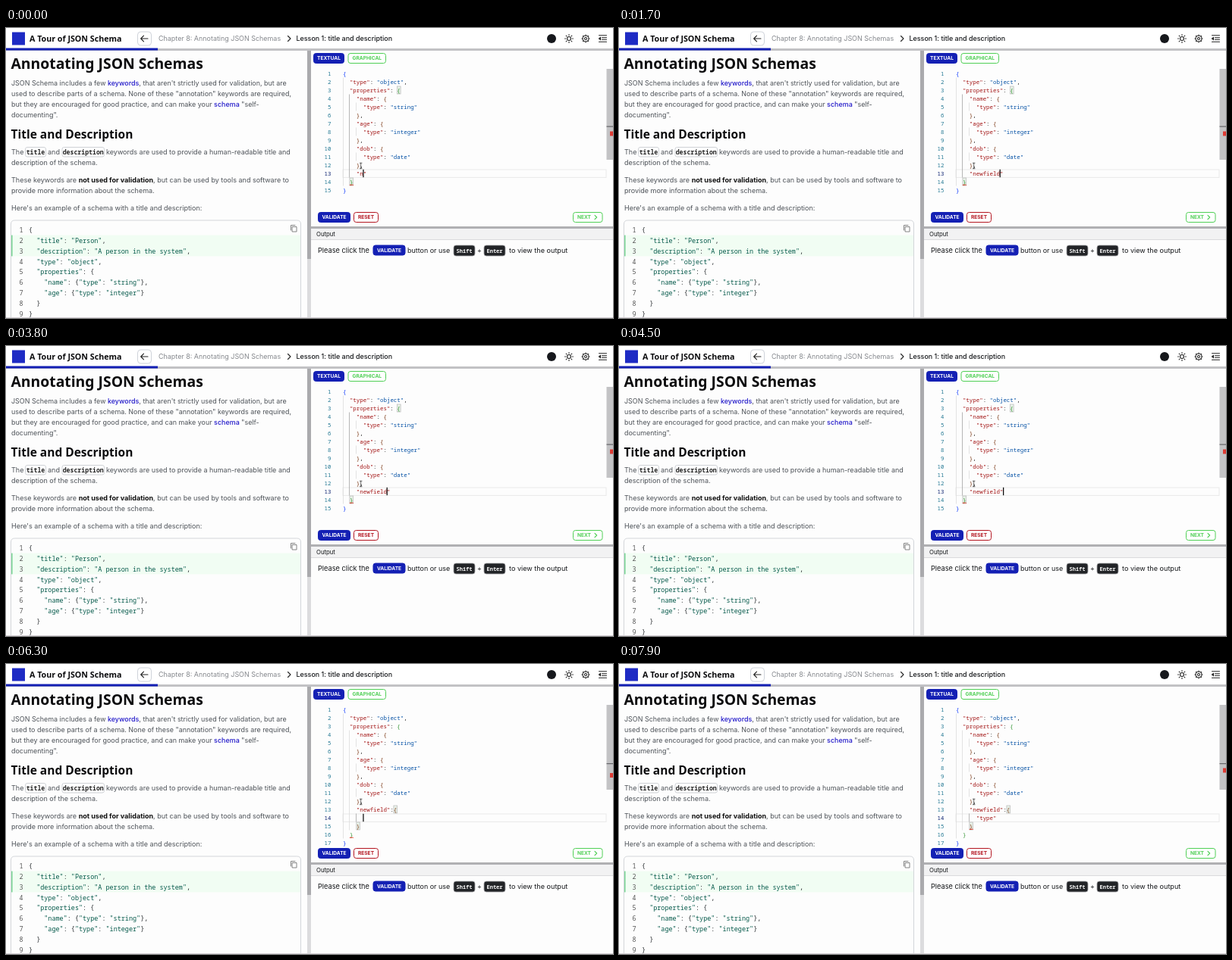
Recreate the animation shown at these times as an HTML page. Size 800 px wide and 383 px high, loop 8 s.

```html
<!DOCTYPE html>
<html lang="en">
<head>
<meta charset="utf-8">
<title>Annotating JSON Schemas</title>
<style>
  html, body { margin: 0; width: 100%; height: 100%; overflow: hidden; background: #fff; }
  svg { display: block; width: 800px; height: 383px; }
  text { white-space: pre; font: 8.95px Inter, sans-serif; fill: #4d5258; }
  .para text { font-size: 9.03px; }
  .head { font-family: "Noto Sans", "Open Sans", sans-serif; font-weight: 700; fill: #0c0c0e; }
  .link { fill: #2118c9; font-weight: 500; }
  .bold { font-weight: 700; fill: #111; }
  .dark { fill: #15171a; }
  .btn { font-size: 6.6px; font-weight: 700; text-anchor: middle; }
  .mono { font-family: "Noto Sans Mono", "DejaVu Sans Mono", monospace; }
  .para .tag { font-size: 8.2px; font-weight: 700; fill: #222; text-anchor: middle; }
  .sample { font-size: 8.46px; fill: #2c3033; }
  .edit { font-size: 7.43px; fill: #222; }
  .line { fill: none; stroke: #222; stroke-width: 1.1; stroke-linecap: round; stroke-linejoin: round; }
</style>
</head>
<body>
<svg viewBox="0 0 800 383">
  <rect y="29" width="800" height="354" fill="#fdfdfd"/>

  <!-- top bar -->
  <rect y="27" width="800" height="3" fill="#c2c2c5"/>
  <rect y="26.5" width="200" height="3" fill="#1420b4"/>
  <rect x="8" y="5.5" width="17" height="17" fill="#1e2bc4"/>
  <text class="head" x="31" y="18" style="font-size:10.7px">A Tour of JSON Schema</text>
  <rect x="173.5" y="5" width="18" height="18" rx="4" fill="#fff" stroke="#cfd3da"/>
  <path class="line" d="M187 14H178M181.5 10.2L177.7 14l3.8 3.8"/>
  <text x="201" y="17.3" style="fill:#85888d">Chapter 8: Annotating JSON Schemas</text>
  <path class="line" d="M371.5 10.5l3.5 3.5-3.5 3.5"/>
  <text class="dark" x="382.5" y="17.3" style="font-weight:500">Lesson 1: title and description</text>
  <circle cx="719" cy="14" r="6" fill="#16181c"/>
  <g id="sun" class="line"><circle cx="742" cy="14" r="2.5"/></g>
  <g id="gear" class="line"><circle cx="764" cy="14" r="4"/><circle cx="764" cy="14" r="1.5"/></g>
  <path class="line" d="M781.5 9.8h10M785.5 12.7h6M785.5 15.3h6M781.5 18.2h10M783.5 12.3L781.5 14l2 1.7z"/>

  <!-- lesson -->
  <text class="head" x="6.5" y="53.7" style="font-size:19.35px">Annotating JSON Schemas</text>
  <text x="7" y="76.3">JSON Schema includes a few <tspan class="link">keywords</tspan>, that aren't strictly used for validation, but are</text>
  <text x="7" y="90.3">used to describe parts of a schema. None of these "annotation" keywords are required,</text>
  <text x="7" y="104.3">but they are encouraged for good practice, and can make your <tspan class="link">schema</tspan> "self-</text>
  <text x="7" y="118.3">documenting".</text>
  <text class="head" x="6.5" y="146.3" style="font-size:15.5px">Title and Description</text>
  <g class="para">
    <text x="7" y="166.5">The</text>
    <rect x="25.5" y="157.5" width="27" height="12.5" rx="2.5" fill="#fff" stroke="#cfd2d6"/>
    <text class="mono tag" x="39" y="166.5">title</text>
    <text x="55" y="166.5">and</text>
    <rect x="74" y="157.5" width="55.5" height="12.5" rx="2.5" fill="#fff" stroke="#cfd2d6"/>
    <text class="mono tag" x="101.7" y="166.5">description</text>
    <text x="132" y="166.5">keywords are used to provide a human-readable title and</text>
    <text x="7" y="180.7">description of the schema.</text>
    <text x="7" y="203.7">These keywords are <tspan class="bold">not used for validation</tspan>, but can be used by tools and software to</text>
    <text x="7" y="217.7">provide more information about the schema.</text>
    <text x="7" y="240.7">Here's an example of a schema with a title and description:</text>
  </g>
  <path d="M6.5 383V259q0-5 5-5H383.5q5 0 5 5V383" fill="#fdfdfd" stroke="#d3d6da"/>
  <rect x="7" y="273.6" width="381" height="27.8" fill="#f1fdf3"/>
  <rect x="7" y="273.6" width="1.6" height="27.8" fill="#7fd69a"/>
  <g id="sample"></g>
  <path class="line" style="stroke:#777;stroke-width:.9" d="M377.5 262.5h5.5v6.5h-5.5zM375.5 267v-6.5h5.5"/>

  <!-- splitters -->
  <rect x="397" y="30" width="5" height="353" fill="#dcdcde"/>
  <rect x="397" y="30" width="5" height="275" fill="#aaaaad"/>

  <!-- editor -->
  <g id="editor"></g>
  <g id="buttons"></g>
  <path class="line" style="stroke:#4fcf55;stroke-width:1.2" d="M776 247.4l2.6 2.6-2.6 2.6"/>

  <!-- output -->
  <rect x="402" y="262" width="398" height="3" fill="#b0b0b3"/>
  <rect x="402" y="265" width="398" height="14" fill="#f2f2f3"/>
  <path d="M402 279.5H800" stroke="#dadadd"/>
  <text class="dark" x="409" y="275" style="font-size:7.75px">Output</text>
  <text class="dark" x="411" y="297.2" style="font-size:9.2px">Please click the</text>
  <text class="dark" x="529" y="297.2">button or use</text>
  <text class="dark" x="621" y="297.2">+</text>
  <text class="dark" x="663" y="297.2" style="font-size:9.1px">to view the output</text>
  <g id="keys"></g>
  <path d="M0 382.5H800" stroke="#d8d3d8"/>
</svg>
<script>
const $ = id => document.getElementById(id);
const span = (s, color) => `<tspan style="fill:${color}">${s}</tspan>`;
const BLUE = '#1420b4', GREEN = '#4fcf55', RED = '#b3141f';

// rays around the two header icons
function rays(id, cx, cy, r1, r2) {
  let d = '';
  for (let i = 0; i < 8; i++) {
    const c = Math.cos(i * Math.PI / 4), s = Math.sin(i * Math.PI / 4);
    d += `M${cx + c * r1} ${cy + s * r1}L${cx + c * r2} ${cy + s * r2}`;
  }
  $(id).innerHTML += `<path d="${d}"/>`;
}
rays('sun', 742, 14, 4.4, 5.4);
rays('gear', 764, 14, 4.2, 5);

// buttons and key caps
function button(label, x, y, w, color, solid, tx = x + w / 2) {
  return `<rect x="${x + .5}" y="${y + .5}" width="${w - 1}" height="13" rx="3" fill="${solid ? color : '#fff'}" stroke="${color}"/>` +
    `<text class="btn" x="${tx}" y="${y + 9.4}" style="fill:${solid ? '#fff' : color}">${label}</text>`;
}
$('buttons').innerHTML =
  button('TEXTUAL', 405, 33, 41, BLUE, true) +
  button('GRAPHICAL', 450.5, 33, 50.5, GREEN) +
  button('VALIDATE', 411, 243, 43, BLUE, true) +
  button('RESET', 458, 243, 33, RED) +
  button('NEXT', 747, 243, 39.5, GREEN, false, 762);

const key = (label, x, w) =>
  `<rect x="${x}" y="287" width="${w}" height="14" rx="3" fill="#222427" stroke="#a4a4a8" stroke-width=".8"/>` +
  `<text class="mono" x="${x + w / 2}" y="296.5" text-anchor="middle" style="font-size:7px;font-weight:700;fill:#fff">${label}</text>`;
$('keys').innerHTML = button('VALIDATE', 483.5, 286.5, 43, BLUE, true) +
  key('Shift', 590, 28) + key('Enter', 630, 28);

// example listing
const sample = ['{', '  "title": "Person",', '  "description": "A person in the system",',
  '  "type": "object",', '  "properties": {', '    "name": {"type": "string"},',
  '    "age": {"type": "integer"}', '  }', '}'];
$('sample').innerHTML = sample.map((s, i) => {
  const y = 270 + i * 13.85;
  const body = s.replace(/"[^"]*"/g, m => span(m, '#065a4b'));
  return `<text class="mono sample" x="17.5" y="${y}" style="fill:#555">${i + 1}</text>` +
    `<text class="mono sample" x="30" y="${y}">${body}</text>`;
}).join('');

// editor
const X = 444, CH = 4.46, ROW = 11, TOP = 60;
const BRACKETS = ['#0431fa', '#319331', '#7b3814'];
const opening = ['{', '  "type": "object",', '  "properties": {', '    "name": {',
  '      "type": "string"', '    },', '    "age": {', '      "type": "integer"', '    },',
  '    "dob": {', '      "type": "date"', '    },'];

// [time, text being typed, caret column in it]
const steps = [];
const NAME = 'newfield';
[0, 200, 400, 700, 900, 1000, 1200, 1400].forEach((t, i) =>
  steps.push([t, `"${NAME.slice(0, i + 1)}"`, i + 2]));
steps.push(
  [2200, '"newfield:"', 10], [2400, '"newfield:{"', 11],
  [3400, '"newfield:"', 10], [3600, '"newfield"', 9],
  [4300, '"newfield"', 10], [4800, '"newfield":', 11],
  [5500, '"newfield":{}', 12], [6000, '', 0], [6600, '""', 1],
  [6800, '"t"', 2], [6950, '"ty"', 3], [7100, '"typ"', 4], [7300, '"type"', 5]);

const colX = c => X + c * CH;
const rowY = r => TOP + r * ROW;

function paint(lines) {
  let depth = 0;
  return lines.map((s, r) => {
    let afterColon = false;
    const body = s.trim().replace(/"[^"]*"|[{}]|:|[^"{}:]+/g, m => {
      if (m[0] === '"') return span(m, afterColon ? '#0451a5' : '#a31515');
      if (m === '{') return span(m, BRACKETS[depth++ % 3]);
      if (m === '}') return span(m, BRACKETS[--depth % 3]);
      if (m === ':') afterColon = true;
      return m;
    });
    const indent = s.length - s.trimStart().length;
    return `<text class="mono edit" x="${colX(indent)}" y="${rowY(r) + 2.8}">${body}</text>`;
  }).join('');
}

const box = (r, c) =>
  `<rect x="${colX(c)}" y="${rowY(r) - 5}" width="${CH + .3}" height="10" fill="#e8f1e8" stroke="#b9b9b9" stroke-width=".7"/>`;
const guide = (c, r1, r2, color = '#dcdcdc') =>
  `<path d="M${Math.floor(colX(c)) + .5} ${rowY(r1) - 5.5}V${rowY(r2) + 5.5}" stroke="${color}" stroke-width=".8"/>`;
const squiggle = (r, c) =>
  `<path d="M${colX(c)} ${rowY(r) + 5}l1.2-1.3 1.2 1.3 1.2-1.3 1.2 1.3" fill="none" stroke="#e51400" stroke-width=".8"/>`;

function draw([time, text, caret]) {
  const split = time >= 6000, nested = time >= 5500, moved = time >= 6800;
  const lines = opening.concat(split
    ? ['    "newfield":{', '      ' + text, '    }']
    : ['    ' + text], '  }', '}');
  const active = split ? 13 : 12, last = lines.length - 1;
  const col = (split ? 6 : 4) + caret;
  const boxes = split ? box(12, 15) + box(14, 4)
    : nested ? box(12, 15) + box(12, 16) : box(2, 16) + box(13, 2);
  const numbers = lines.map((_, r) =>
    `<text class="mono edit" text-anchor="end" x="428.5" y="${rowY(r) + 2.8}" style="fill:${r === active ? '#0b216f' : '#237893'}">${r + 1}</text>`).join('');
  const guides = guide(0, 1, last - 1) +
    guide(2, 3, last - 2, split ? undefined : '#a5a5a5') +
    [4, 7, 10].map(r => guide(4, r, r)).join('') +
    (split ? guide(4, 13, 13, '#a5a5a5') : '');
  const markY = split && !moved ? 144 : split ? 137.5 : 136.5;
  const ruler = `<rect x="791.5" y="54" width="8.5" height="${split ? 112 : 120}" fill="#c3c3c5"/>` +
    `<rect x="791.5" y="${split ? 131 : 129.5}" width="8.5" height="1.2" fill="#66666a"/>` +
    `<rect x="796" y="${markY}" width="4" height="6" fill="#dd3b34"/>`;
  // pointer resting beside the comma on line 12
  const pointer = `<path d="M466 178.3h3.4M467.7 178.3v7.4M466 185.7h3.4" stroke="#222" stroke-width=".7"/>`;
  $('editor').innerHTML =
    `<rect x="${X}" y="${rowY(active) - 5}" width="347" height="10.4" fill="none" stroke="#e9e9e9"/>` +
    guides + boxes + numbers + paint(lines) +
    squiggle(moved ? 14 : last - 1, moved ? 4 : 2) + ruler + pointer +
    `<rect id="caret" x="${colX(col) - .4}" y="${rowY(active) - 5.2}" width="1.2" height="10.4" fill="#000"/>`;
}

let shown;
function tick() {
  const t = performance.now() % 8000;
  const step = steps.findLast(s => s[0] <= t);
  if (step !== shown) draw(shown = step);
  $('caret').setAttribute('opacity', (t - step[0]) % 1000 < 500 ? 1 : 0);
  requestAnimationFrame(tick);
}
tick();
</script>
</body>
</html>
```
